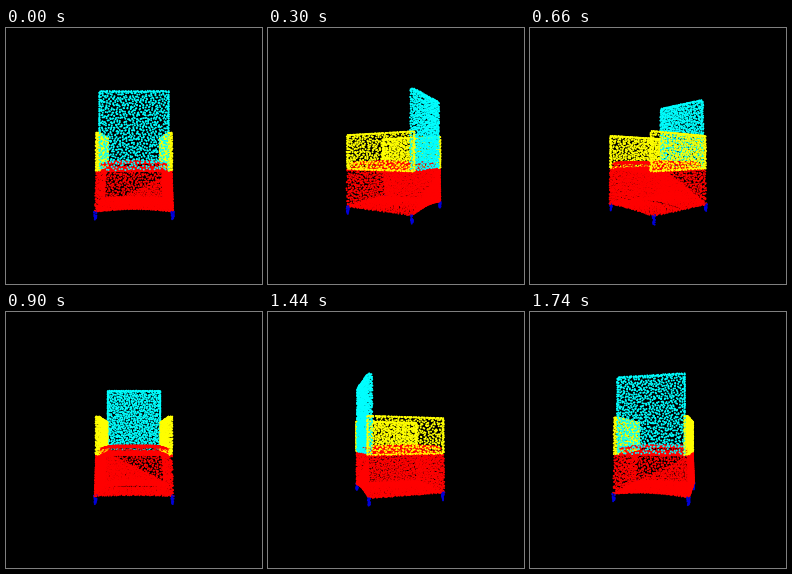
These frames come from a looping animation (256 px wide and 256 px high, 1800 ms). A matplotlib script:

```python
import numpy as np
import matplotlib.pyplot as plt
from matplotlib.animation import FuncAnimation

SIZE, DPI = 256, 64
FRAMES, STEP_MS = 30, 60
CAMERA = 236          # camera distance, in pixels at the pivot's depth
DOT = 1.95            # dot diameter in pixels

RED, YELLOW, CYAN, BLUE = (1, 0, 0), (1, 1, 0), (0, 1, 1), (0, 0, .85)
rng = np.random.default_rng(7)
points, colors = [], []


def add(pts, color):
    points.append(pts)
    colors.append(np.tile(color, (len(pts), 1)))


def patch(corner, u, v, gap, color, keep=None, shape=None):
    """Scatter evenly spread dots over a parallelogram."""
    corner, u, v = (np.array(a, float) for a in (corner, u, v))
    nu = max(2, round(np.linalg.norm(u) / gap))
    nv = max(2, round(np.linalg.norm(v) / gap))
    i, j = (g.ravel() for g in np.meshgrid(np.arange(nu), np.arange(nv)))
    s = (i + .25 + .5 * (j % 2) + rng.uniform(-.33, .33, i.size)) / nu
    t = (j + .5 + rng.uniform(-.42, .42, i.size)) / nv
    s, t = np.clip(s, 0, 1), np.clip(t, 0, 1)
    if keep is not None:
        mask = keep(s, t)
        s, t = s[mask], t[mask]
    pts = corner + s[:, None] * u + t[:, None] * v
    add(shape(pts) if shape else pts, color)


def box(x0, x1, y0, y1, z0, z1, gap, color, edge):
    """Box whose large x faces use gap and whose narrow sides use edge."""
    dx, dy, dz = (x1 - x0, 0, 0), (0, y1 - y0, 0), (0, 0, z1 - z0)
    for x in (x0, x1):
        patch((x, y0, z0), dy, dz, gap, color)
    for y in (y0, y1):
        patch((x0, y, z0), dx, dz, edge, color)
    for z in (z0, z1):
        patch((x0, y0, z), dx, dy, edge, color)


def flare(pts):
    """Widen the base towards the floor and arch its lower hem."""
    x, y, z = pts.T
    low = (y - TOP) / (HEM - TOP)
    arch = np.where(z > 0, 2.5, 1) * (1 - (x / W) ** 2) * low ** 3
    return np.c_[x * (1 + .035 * low), y - arch, z]


def pillow(pts):
    x, y, z = pts.T
    return np.c_[x, y + 1.8 * np.abs(x / 30) ** 10, z]


# x to the right, y down, z towards the camera; the backrest starts in front
W, F, B = 32.4, -35.5, 34.5
TOP, HEM = 13, 48
wide, deep, tall = (2 * W, 0, 0), (0, 0, B - F), (0, HEM - TOP, 0)

# base
patch((-W, TOP, F), wide, tall, 3, RED, shape=flare)
patch((-W, TOP, B), wide, tall, 3, RED, shape=flare)
patch((-W, TOP, B), wide, tall, 1.5, RED, lambda s, t: s + t > 1, flare)
patch((-W, TOP, F), deep, tall, 2.9, RED, shape=flare)
patch((W, TOP, F), deep, tall, 1.5, RED, shape=flare)
patch((-W, TOP, F), wide, deep, 2.3, RED, shape=flare)
patch((-W, HEM, F), wide, deep, 2.1, RED, shape=flare)

# seat cushion
cw, cf, cb = 30, -34.5, 30
patch((-cw, 6.3, cf), (2 * cw, 0, 0), (0, 0, cb - cf), 2.1, RED, shape=pillow)
for z in (cf, cb):
    patch((-cw, 6.3, z), (2 * cw, 0, 0), (0, 6.7, 0), 2.9, RED, shape=pillow)
for x in (-cw, cw):
    patch((x, 7.5, cf), (0, 5.5, 0), (0, 0, cb - cf), 2.9, RED)

# arms
for x0, x1 in ((-32.7, -29.6), (29.6, 32.7)):
    box(x0, x1, -20, 12.5, F, 35, 2.9, YELLOW, 1.8)

# backrest
bw, bt, bi = 29.8, -55.7, 30.5
patch((-bw, bt, B), (2 * bw, 0, 0), (0, 68.5, 0), 2.7, CYAN)
patch((-bw, bt, bi), (2 * bw, 0, 0), (0, 62, 0), 2.7, CYAN)
patch((-bw, bt, bi), (2 * bw, 0, 0), (0, 0, B - bi), 2, CYAN)
for x in (-bw, bw):
    patch((x, bt, bi), (0, 68.5, 0), (0, 0, B - bi), 2, CYAN)

# legs
for x in (-W, W):
    for z in (F + 1.5, B - .5):
        n = 22
        y = rng.uniform(47.5, 55, n)
        r = 1.2 - .1 * (y - 47.5)
        a = rng.uniform(0, 2 * np.pi, n)
        add(np.c_[x * 1.02 + r * np.cos(a), y, z + r * np.sin(a)], BLUE)

points, colors = np.vstack(points), np.vstack(colors)

fig = plt.figure(figsize=(SIZE / DPI, SIZE / DPI), dpi=DPI, facecolor="black")
ax = fig.add_axes([0, 0, 1, 1])
ax.set(xlim=(0, SIZE), ylim=(SIZE, 0))
ax.axis("off")
dots = ax.scatter(points[:, 0], points[:, 1], s=(DOT * 72 / DPI) ** 2,
                  c=colors, linewidths=0)


def draw(frame):
    a = 2 * np.pi * frame / FRAMES
    x, y, z = points.T
    depth = z * np.cos(a) - x * np.sin(a)
    side = x * np.cos(a) + z * np.sin(a)
    zoom = 1 / (1 - depth / CAMERA)
    order = np.argsort(depth)
    screen = SIZE / 2 + np.c_[side * zoom, y * zoom]
    dots.set_offsets(screen[order])
    dots.set_facecolor(colors[order])
    return dots,


anim = FuncAnimation(fig, draw, frames=FRAMES, interval=STEP_MS,
                     repeat=True, repeat_delay=0, blit=False)
plt.show()
```
